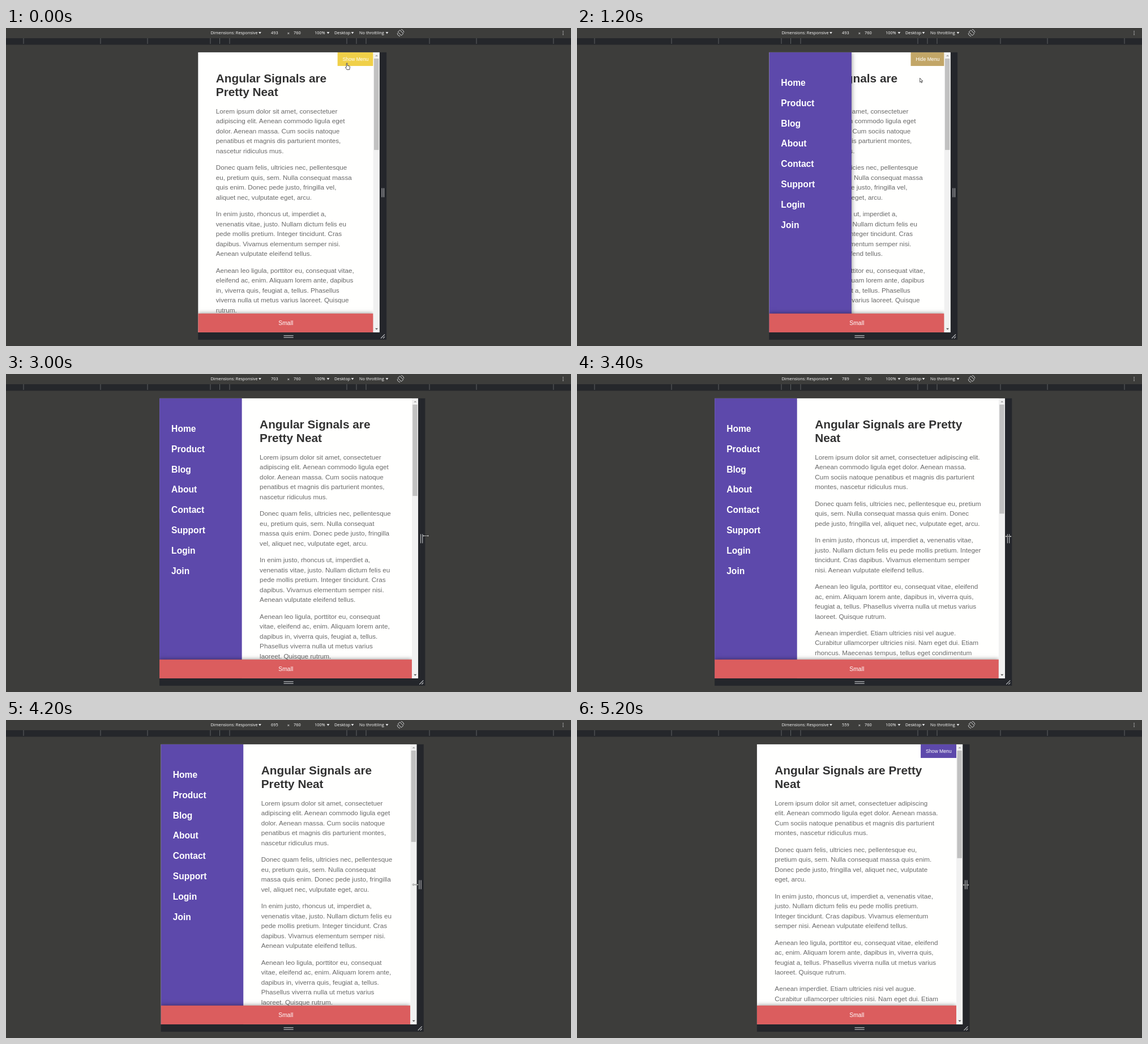
Animation, 998 px wide and 561 px high, one loop 5400 ms. Source, as an HTML page:

```html
<!DOCTYPE html>
<html lang="en">
<head>
<meta charset="utf-8">
<title>Responsive menu</title>
<style>
* { margin: 0; padding: 0; box-sizing: border-box; }
html, body { width: 100%; height: 100%; overflow: hidden; background: #3d3d3b; }
body { font-family: "Liberation Sans", Arial, sans-serif; }
svg { position: absolute; left: 0; top: 0; width: 998px; height: 561px; }
svg text { font: 7.35px "Open Sans", "Noto Sans", sans-serif; fill: #fff; }
#stage { position: absolute; width: 1536px; height: 864px; transform: scale(.65); transform-origin: 0 0; overflow: hidden; }
#frame { position: absolute; top: 66.15px; height: 780px; background: #24262b; }
#device { position: relative; height: 760px; background: #fffffe; overflow: hidden; }
#page { position: absolute; inset: 0 17px 0 0; overflow: hidden; }
#content { padding: 53px 48px 0; color: #6a6a6a; font-size: 18px; line-height: 27px; }
h1 { font-size: 32px; line-height: 36px; color: #323232; margin-bottom: 22px; }
p { margin-bottom: 18px; }
nav { position: absolute; left: 0; top: 0; width: 224px; height: 100%; padding: 54.4px 32px; background: #5d49ab;
  color: #fff; font-weight: bold; font-size: 24px; line-height: 55.2px; }
#button { position: absolute; right: 0; top: 0; height: 36.6px; padding: 0 13.33px; font-size: 13.333px; line-height: 37px; color: #fff; }
footer { position: absolute; left: 0; right: 0; bottom: 0; height: 51px; line-height: 51px; background: #db5d5e;
  color: #fff; text-align: center; font-size: 16px; box-shadow: 0 0 12px rgba(0,0,0,.5); }
#bar { position: absolute; right: 0; top: 0; width: 17px; height: 100%; background: #f1f1f1; }
#thumb { position: absolute; left: 2px; top: 17px; width: 13px; background: #c1c1c1; }
.arrow { position: absolute; left: 5px; border: 4px solid transparent; }
.up { top: 3px; border-bottom-color: #a3a3a3; }
.down { bottom: 3px; border-top-color: #505050; }
</style>
</head>
<body>
<div id="stage">
  <div id="frame">
    <div id="device">
      <div id="page">
        <div id="content">
          <h1>Angular Signals are Pretty Neat</h1>
          <p>Lorem ipsum dolor sit amet, consectetuer adipiscing elit. Aenean commodo ligula eget dolor. Aenean massa. Cum sociis natoque penatibus et magnis dis parturient montes, nascetur ridiculus mus.</p>
          <p>Donec quam felis, ultricies nec, pellentesque eu, pretium quis, sem. Nulla consequat massa quis enim. Donec pede justo, fringilla vel, aliquet nec, vulputate eget, arcu.</p>
          <p>In enim justo, rhoncus ut, imperdiet a, venenatis vitae, justo. Nullam dictum felis eu pede mollis pretium. Integer tincidunt. Cras dapibus. Vivamus elementum semper nisi. Aenean vulputate eleifend tellus.</p>
          <p>Aenean leo ligula, porttitor eu, consequat vitae, eleifend ac, enim. Aliquam lorem ante, dapibus in, viverra quis, feugiat a, tellus. Phasellus viverra nulla ut metus varius laoreet. Quisque rutrum.</p>
          <p>Aenean imperdiet. Etiam ultricies nisi vel augue. Curabitur ullamcorper ultricies nisi. Nam eget dui. Etiam rhoncus. Maecenas tempus, tellus eget condimentum rhoncus, sem quam semper libero.</p>
        </div>
        <nav id="menu">Home<br>Product<br>Blog<br>About<br>Contact<br>Support<br>Login<br>Join</nav>
        <div id="button"></div>
        <footer>Small</footer>
      </div>
      <div id="bar"><i class="arrow up"></i><i id="thumb"></i><i class="arrow down"></i></div>
    </div>
  </div>
</div>
<svg viewBox="0 0 998 561">
  <path fill="#25272b" d="M0 18h998v11.5H0z"/>
  <path id="ticks" stroke="#67696c" stroke-width=".9"/>
  <text x="361.5" y="11.2">Dimensions: Responsive</text>
  <text x="468" y="11.2" id="size"></text>
  <text x="496.8" y="12">×</text>
  <text x="508" y="11.2">760</text>
  <text x="545" y="11.2">100%</text>
  <text x="580" y="11.2">Desktop</text>
  <text x="624" y="11.2">No throttling</text>
  <path id="carets" fill="#e4e5e7"/>
  <g fill="none" stroke="#e0e2e5" stroke-width=".9">
    <rect x="694.6" y="4.2" width="4.8" height="8.6" transform="rotate(-45 697 8.5)"/>
    <path d="M691.3 9a5.7 5.7 0 0 0 4.8 5.4M702.7 8a5.7 5.7 0 0 0-4.8-5.4"/>
  </g>
  <path stroke="#e4e5e7" stroke-width="1.3" d="M983.4 5.9h1.3m-1.3 2.9h1.3m-1.3 2.9h1.3"/>
  <path stroke="#b4b6b9" stroke-width="1.2" d="M490.5 542.6h17.2m-17.2 3.2h17.2"/>
  <path id="grips" stroke="#b4b6b9" stroke-width="1.2" d="M4.2 282.5v16m3.2-16v16M2 547.5l7-7M6 547.5l3-3"/>
  <g id="cursor" stroke="#222" stroke-width=".8" stroke-linejoin="round">
    <path fill="#fff" d="M-2.2-5.6q1-1 1.8 0v4l3.2.7q1.4.4 1.2 1.8L3.2 5.5h-4.6L-3.8 1.8q-.4-1.3 1.6-.6z"/>
    <path fill="#fff" d="M-2.3-4.2v7.4l1.7-1.5L.5 4.2l1.2-.5L.6 1.2h2.2z"/>
    <path fill="#fff" stroke-width=".4" d="M-5.4 0l2-1.7v1.2h6.8v-1.2l2 1.7-2 1.7V.5h-6.8v1.2z"/>
  </g>
</svg>
<script>
const $ = id => document.getElementById(id);
const SCALE = .65, CENTER = 499.8, LOOP = 5400, STEP = 200, BREAKPOINT = 600;
const clamp = v => Math.max(0, Math.min(1, v));
const ease = v => v * v * (3 - 2 * v);

// Each key is [time, value, ...]
const widths = [[2200, 493], [2400, 503], [2600, 556], [2800, 628], [3000, 703], [3200, 762], [3400, 789],
  [3600, 791], [3800, 782], [4000, 745], [4200, 695], [4400, 648], [4600, 608], [4800, 579], [5200, 559]];
const pointer = [[1000, 603.5, 68], [1200, 608, 92.5], [1400, 622, 150], [1800, 660, 270], [2000, 667, 288],
  [2400, 674, 286], [3000, 741.5, 285.5], [3400, 762, 286.5], [3800, 757, 288], [4200, 723, 290.5], [5200, 687, 291]];

function at(keys, t) {
  const i = keys.findIndex(k => k[0] >= t);
  if (i <= 0) return keys.at(i).slice(1);
  const a = keys[i - 1], b = keys[i], f = (t - a[0]) / (b[0] - a[0]);
  return a.slice(1).map((v, j) => v + (b[j + 1] - v) * f);
}

$("ticks").setAttribute("d", [31, 167, 250, 361, 377.5, 395, 602, 619, 636, 748, 831, 967].map(x => `M${x} 18v10`).join(""));
$("carets").setAttribute("d", [448.5, 569, 612, 673].map(x => `M${x - 2.4} 7h4.8l-2.4 3.6z`).join(""));

function draw(t) {
  const w = Math.round(at(widths, t)[0]), wide = w >= BREAKPOINT;
  const closed = t > 3400 && !wide;
  const slide = wide ? 1 : closed ? 0 : ease(clamp((t - 300) / 500));

  $("frame").style.left = CENTER / SCALE - w / 2 + "px";
  $("frame").style.width = w + 18.5 + "px";
  $("device").style.width = w + "px";
  $("content").style.marginLeft = wide ? "224px" : 0;
  $("menu").style.transform = `translateX(${(slide - 1) * 100}%)`;
  $("menu").style.boxShadow = wide || !slide ? "none" : "0 0 12px rgba(0,0,0,.5)";

  const leave = clamp((t - 1100) / 320);
  const mix = (a, b) => a + (b - a) * leave;
  $("button").style.display = wide ? "none" : "block";
  $("button").style.background = `rgb(${mix(240, 93)},${mix(208, 73)},${mix(72, 171)})`;
  $("button").textContent = slide ? "Hide Menu" : "Show Menu";

  const column = w - 113 - (wide ? 224 : 0);
  $("thumb").style.height = 248 + Math.max(0, column - 380) * .66 + "px";
  $("size").textContent = w;
  $("grips").setAttribute("transform", `translate(${CENTER + w * SCALE / 2})`);

  const shape = t < 1100 ? 0 : t < 2000 ? 1 : 2;
  [...$("cursor").children].forEach((c, i) => c.style.display = i === shape ? "" : "none");
  $("cursor").setAttribute("transform", `translate(${at(pointer, t)})`);
}

function tick(now) {
  draw(Math.floor(now % LOOP / STEP) * STEP);
  requestAnimationFrame(tick);
}
draw(0);
requestAnimationFrame(tick);
</script>
</body>
</html>
```
